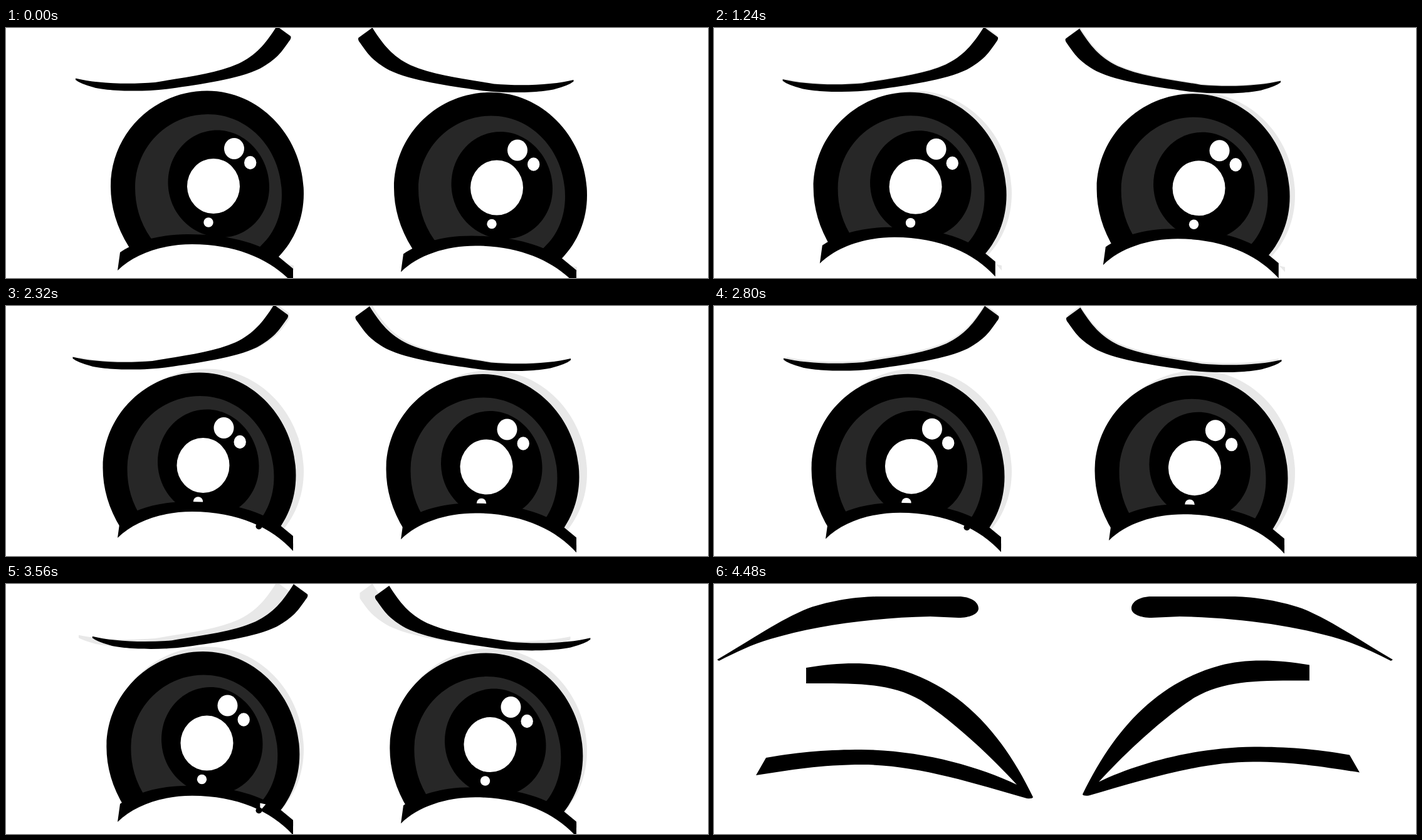
These frames come from a looping animation (1120 px wide and 400 px high, 4.64 s). An HTML page:

```html
<!DOCTYPE html>
<html lang="en">
<head>
<meta charset="utf-8">
<title>Trembling eyes</title>
<style>
  html, body { margin: 0; width: 100%; height: 100%; overflow: hidden; background: #fff; }
  svg { display: block; width: 1120px; height: 400px; }
</style>
</head>
<body>
<svg viewBox="0 0 1120 400">
  <defs>
    <clipPath id="browTrim"><rect x="116" y="-20" width="336" height="140"/></clipPath>
    <path id="brow" d="M111 80.5C140 88 190 91 238 87C290 78 335 73 371 57C400 43 415 24 432-3L454 13Q456 16 451 22C440 38 432 50 405 65C370 82 310 90 262 97C220 103 160 101 140 95Q118 89 111 83Z"/>
    <path id="iris" d="M167 253C167 169 236 100.5 321 100.5C406 100.5 475 175 475 265C475 305 460 340 435 366C415 388 380 400 320 400C260 400 215 380 196 350C176 318 167 285 167 253Z"/>
    <path id="ring" d="M206 255C206 190 258 138 322 138C388 138 440 195 440 267C440 300 428 328 408 347C380 380 270 380 231 336C213 310 206 283 206 255Z"/>
    <g id="pupil">
      <path d="M258.5 247C258.5 201 293 163.5 337 163.5C382 163.5 420 205 420 255C420 300 385 335 345 335C296 335 258.5 295 258.5 247Z"/>
      <g fill="#fff">
        <ellipse cx="331" cy="253" rx="42" ry="44"/>
        <ellipse cx="364" cy="193" rx="16" ry="17"/>
        <ellipse cx="389.7" cy="215.5" rx="9.7" ry="10.7"/>
        <circle cx="323" cy="311" r="7.7"/>
      </g>
    </g>
    <g id="lid">
      <path fill="#fff" d="M180 386C205 361 250 340 297 340C370 340 425 372 456 404V440H180Z"/>
      <path d="M182 359C205 343 240 330 290 330C350 330 400 342 435 366L458 385V409C425 372 370 346 297 346C250 346 205 361 178 388Z"/>
    </g>
    <g id="shade" fill="#e8e8e8">
      <use href="#iris"/>
      <path d="M450 378L459 380V388Z"/>
    </g>
    <g id="browShade" fill="#e8e8e8" clip-path="url(#browTrim)"><use href="#brow"/></g>
    <g id="eye">
      <g class="iris"><use href="#iris"/><use href="#ring" fill="#272727"/></g>
      <use class="pupil" href="#pupil"/>
      <use class="lid" href="#lid"/>
    </g>
    <path id="smileBrow" d="M5 121C60 89 105 57 150 39C190 25 235 20 262 20H390C410 20 422 29 422 39C422 48 408 54 390 54L345 52C250 54 160 67 90 88C60 97 35 109 8 123Z"/>
    <path id="smileEye" d="M147 134C200 125 250 124 290 135C400 165 465 250 509 341Q508 344 499 343C410 317 320 289 237 289C170 289 120 298 67 306L83 278C140 268 185 265 235 265C330 266 420 291 483 321C440 274 380 218 330 186C280 158 230 159 147 159Z"/>
  </defs>

  <g id="sad">
    <use href="#shade"/>
    <use href="#shade" x="452" y="2.5"/>
    <use href="#browShade"/>
    <use href="#browShade" transform="translate(1016.5 2.5) scale(-1 1)"/>
    <g class="brow">
      <use href="#brow"/>
      <use href="#brow" transform="translate(1016.5 2.5) scale(-1 1)"/>
    </g>
    <g id="eyes"></g>
    <g class="lid">
      <circle id="dot" cx="403.5" cy="369.5" r="5"/>
      <path id="chip" fill="#fff" d="M-4-4L5-2L-1 5L-4 3Z"/>
    </g>
  </g>

  <g id="happy" display="none">
    <use href="#smileBrow"/>
    <use href="#smileBrow" transform="translate(1088) scale(-1 1)"/>
    <use href="#smileEye"/>
    <use href="#smileEye" transform="translate(1097 -4.5) scale(-1 1)"/>
  </g>
</svg>
<script>
  const LOOP = 4640, SMILE = 4480, STEP = 40;

  // time, x, y
  const tracks = {
    iris: [[0, 0, 0], [680, -4, 1.5], [1760, -11.5, 3], [2320, -12.5, 6], [3240, -9.5, 9.5], [3920, -3, 4], [SMILE, 0, 0]],
    pupil: [[0, 0, 0], [680, -6, 1], [1760, -12.5, .5], [2320, -16.5, 2], [3240, -15, 4.5], [3920, -4, -2], [SMILE, 0, 0]],
    lid: [[0, 0, 0], [680, -14, -9], [1760, -3, -13], [2320, 0, -17], [3240, 0, -12], [3920, 0, -2], [SMILE, 0, 0]],
    brow: [[0, 0, 0], [680, 0, 4], [1140, -1, 2], [1760, -4, -1.5], [2320, -4.5, 1], [2800, 0, 3], [3240, 19, 5], [3600, 27, 3], [3920, 19, 0], [SMILE, 0, 0]]
  };

  const byId = id => document.getElementById(id);
  const show = (el, on) => el.setAttribute('display', on ? 'inline' : 'none');
  const move = (el, x, y) => el.setAttribute('transform', `translate(${x.toFixed(2)} ${y.toFixed(2)})`);

  // Two copies of the eye, side by side
  for (const [x, y] of [[0, 0], [452, 2.5]]) {
    const eye = byId('eye').cloneNode(true);
    eye.removeAttribute('id');
    move(eye, x, y);
    byId('eyes').append(eye);
  }

  const parts = Object.keys(tracks).map(name => [tracks[name], byId('sad').querySelectorAll('.' + name)]);

  // Monotone cubic: smooth without overshoot
  function sample(keys, t, axis) {
    let i = 0;
    while (i < keys.length - 2 && t >= keys[i + 1][0]) i++;
    const slope = k => (keys[k + 1][axis] - keys[k][axis]) / (keys[k + 1][0] - keys[k][0]);
    const tangent = k => {
      if (k === 0) return slope(0);
      if (k === keys.length - 1) return slope(k - 1);
      const a = slope(k - 1), b = slope(k);
      return a * b > 0 ? 2 * a * b / (a + b) : 0;
    };
    const [p, q] = [keys[i], keys[i + 1]];
    const span = q[0] - p[0], u = (t - p[0]) / span, v = 1 - u;
    return v * v * (1 + 2 * u) * p[axis] + u * u * (3 - 2 * u) * q[axis]
      + span * u * v * (v * tangent(i) - u * tangent(i + 1));
  }

  function draw(t) {
    const smiling = t >= SMILE;
    show(byId('sad'), !smiling);
    show(byId('happy'), smiling);
    if (smiling) return;
    for (const [keys, els] of parts) {
      const x = sample(keys, t, 1), y = sample(keys, t, 2);
      els.forEach(el => move(el, x, y));
    }
    show(byId('dot'), t > 2100 && t < 3600);
    show(byId('chip'), t > 3000);
    const u = (t - 3240) / 680;
    move(byId('chip'), 407 + 5 * u, 364 - 5 * u);
  }

  const start = performance.now();
  function tick() {
    const t = (performance.now() - start) % LOOP;
    draw(Math.floor(t / STEP) * STEP);
    requestAnimationFrame(tick);
  }
  tick();
</script>
</body>
</html>
```
